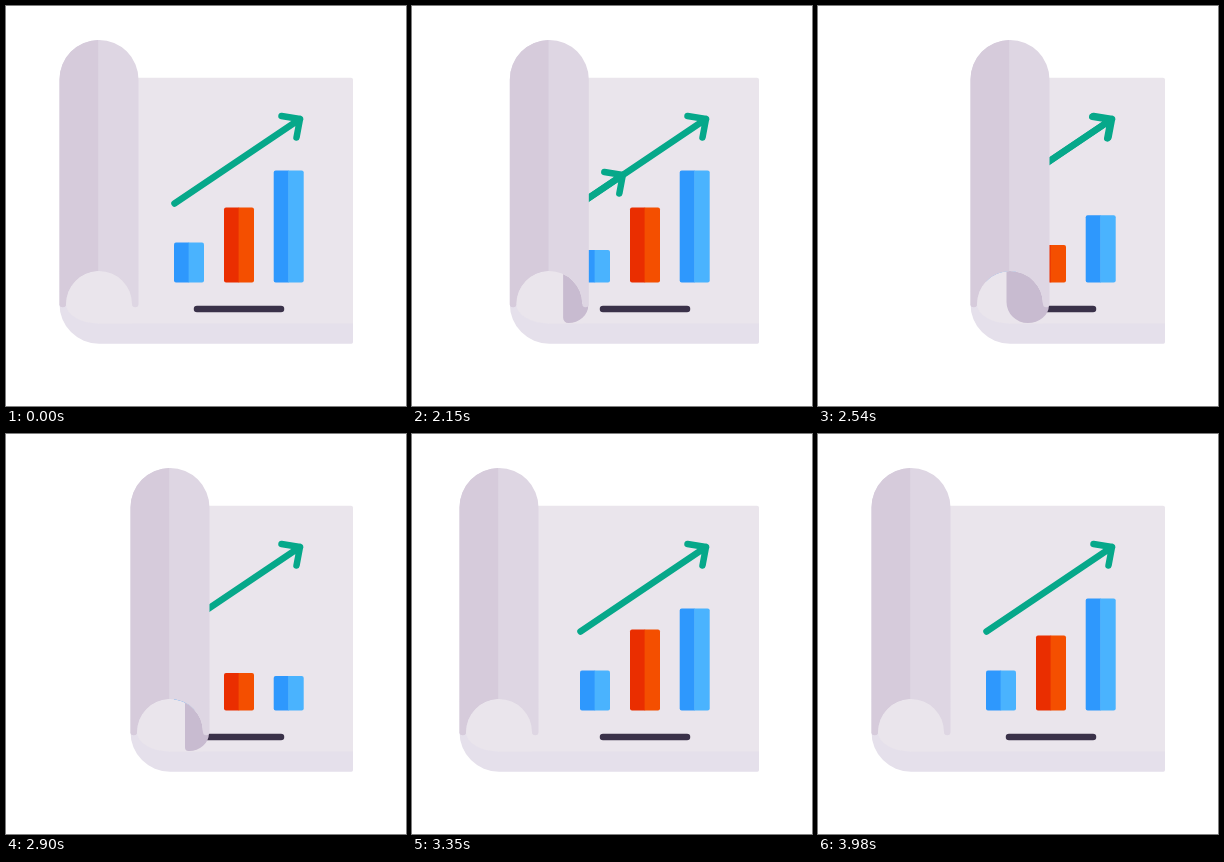
An HTML page that plays this animation: 400x400 px, repeating every 4.01 s.

```html
<!DOCTYPE html>
<html lang="en">
<head>
<meta charset="utf-8">
<title>Growth chart scroll</title>
<style>
  html, body { margin: 0; width: 100%; height: 100%; overflow: hidden; background: #fff; }
  svg { display: block; width: 100%; height: 100%; }
  .arrow { fill: none; stroke: #06a88a; stroke-width: 6.5; stroke-linecap: round; stroke-linejoin: round; }
</style>
</head>
<body>
<svg viewBox="0 0 400 400">
  <path id="strip" fill="#e5e0eb"/>
  <path id="paper" fill="#eae5ec"/>
  <g id="bars"></g>
  <path d="M191 303H275" stroke="#3a3149" stroke-width="6.5" stroke-linecap="round"/>
  <path class="arrow" d="M168.5 197.5L294 113M275.5 110L294 113L290.5 131.5"/>
  <path class="arrow" id="trace"/>
  <g id="roll">
    <path fill="#eae5ec" d="M6.5 298A33 33 0 0 1 72.5 298V317.5H39A32.5 19.5 0 0 1 6.5 298Z"/>
    <path id="inner" fill="#c8bbd0" clip-path="url(#dome)"/>
    <path fill="#ded6e3" d="M0 73.5A39.5 39.5 0 0 1 79 73.5V298A3.25 3.25 0 0 1 72.5 298A33 33 0 0 0 6.5 298A3.25 3.25 0 0 1 0 298Z"/>
    <path fill="#d6cbdb" d="M0 73.5A39.5 39.5 0 0 1 38.7 34V265A33 33 0 0 0 6.5 298A3.25 3.25 0 0 1 0 298Z"/>
  </g>
  <clipPath id="dome"><path d="M6.5 298A33 33 0 0 1 72.5 298H79V320H6.5Z"/></clipPath>
</svg>
<script>
const LOOP = 4010, START = 2030, STEP = 30, BASE = 276;
const $ = id => document.getElementById(id);

// Smooth curve through [time, value] keys that never overshoots them.
function track(keys) {
  const n = keys.length;
  const slope = i => (keys[i + 1][1] - keys[i][1]) / (keys[i + 1][0] - keys[i][0]);
  const tan = keys.map((_, i) => {
    if (i === 0 || i === n - 1) return 0;
    const a = slope(i - 1), b = slope(i);
    return a * b > 0 ? 2 * a * b / (a + b) : 0;
  });
  return t => {
    if (t <= keys[0][0]) return keys[0][1];
    if (t >= keys[n - 1][0]) return keys[n - 1][1];
    let i = 0;
    while (t > keys[i + 1][0]) i++;
    const [t0, v0] = keys[i], [t1, v1] = keys[i + 1];
    const d = t1 - t0, u = (t - t0) / d, w = 1 - u;
    return v0 * (1 + 2 * u) * w * w + v1 * u * u * (3 - 2 * u)
      + d * (tan[i] * u * w * w - tan[i + 1] * u * u * w);
  };
}

const rollX = track([[2000, 53.5], [2030, 60.5], [2300, 135.5], [2540, 152.5], [2600, 153.5],
  [2900, 124.5], [3080, 55], [3200, 34.5], [3350, 47.5], [3650, 51], [3980, 53.5]]);
const innerWidth_ = track([[2000, 0], [2030, 10.5], [2300, 36.5], [2540, 43], [2600, 43],
  [2900, 24.5], [3080, 0]]);
const draw = track([[2000, 0], [2030, 0.02], [2300, 0.78], [2540, 0.99], [2570, 1]]);
const barScale = track([[0, 1], [100, 0.81], [190, 0.6], [340, 0.5], [525, 0.3], [700, 0.5],
  [1000, 0.91], [1150, 1.08], [1300, 1]]);

const bars = [
  { x: 168, h: 40, delay: 2050, dark: '#2e98fd', light: '#4ab3fe' },
  { x: 218, h: 75, delay: 2200, dark: '#ea2e00', light: '#f44f00' },
  { x: 267.7, h: 112, delay: 2350, dark: '#2e98fd', light: '#4ab3fe' }
];
for (const bar of bars) {
  bar.parts = [bar.dark, bar.light].map(fill => {
    const p = document.createElementNS('http://www.w3.org/2000/svg', 'path');
    p.setAttribute('fill', fill);
    return $('bars').appendChild(p);
  });
}

function drawBar({ x, h, delay, parts }, t) {
  const top = BASE + 0.5 - h * barScale(t - delay), low = BASE + 0.5;
  const side = (from, to) => {
    const r = from < to ? -2 : 2;
    return `M${from} ${top}H${to + r}Q${to} ${top} ${to} ${top + 2}V${low - 2}Q${to} ${low} ${to + r} ${low}H${from}Z`;
  };
  const seam = x + 14.6;
  parts[0].setAttribute('d', side(seam + 0.5, x));
  parts[1].setAttribute('d', side(seam, x + 30));
}

function innerPath(w) {
  if (w < 0.5) return '';
  const right = 78.5, left = 79 - w;
  const low = Math.min(317, 293 + w);
  const span = right - left;
  const r = Math.min(span / 2, Math.max(1, (w - 21) * 1.1));
  const rise = Math.min(18, span - r, low - 284);
  return `M${left} 260V${low - r}A${r} ${r} 0 0 0 ${left + r} ${low}`
    + `A${span - r} ${rise} 0 0 0 ${right} ${low - rise}V260Z`;
}

function tracePath(p) {
  if (p <= 0 || p >= 1) return '';
  const x = 168.5 + 125.5 * p, y = 197.5 - 84.5 * p;
  const s = Math.min(1, 0.1 + 5 * p);
  return `M168.5 197.5L${x} ${y}M${x - 18.5 * s} ${y - 3 * s}L${x} ${y}L${x - 3.5 * s} ${y + 18.5 * s}`;
}

function render(time) {
  const t = time < START ? 0 : START + Math.floor((time - START) / STEP) * STEP;
  const x = rollX(t);
  $('strip').setAttribute('d', `M${x} 298A39.5 39.5 0 0 0 ${x + 39.5} 337.7H345.5Q347 337.7 347 336V298Z`);
  $('paper').setAttribute('d', `M${x + 39} 71.7H345Q347 71.7 347 73.7V317.5H${x + 39}Z`);
  $('roll').setAttribute('transform', `translate(${x} 0)`);
  $('inner').setAttribute('d', innerPath(innerWidth_(t)));
  $('trace').setAttribute('d', tracePath(draw(t)));
  bars.forEach(bar => drawBar(bar, t));
}

const begin = performance.now();
function tick() {
  render((performance.now() - begin) % LOOP);
  requestAnimationFrame(tick);
}
tick();
</script>
</body>
</html>
```
